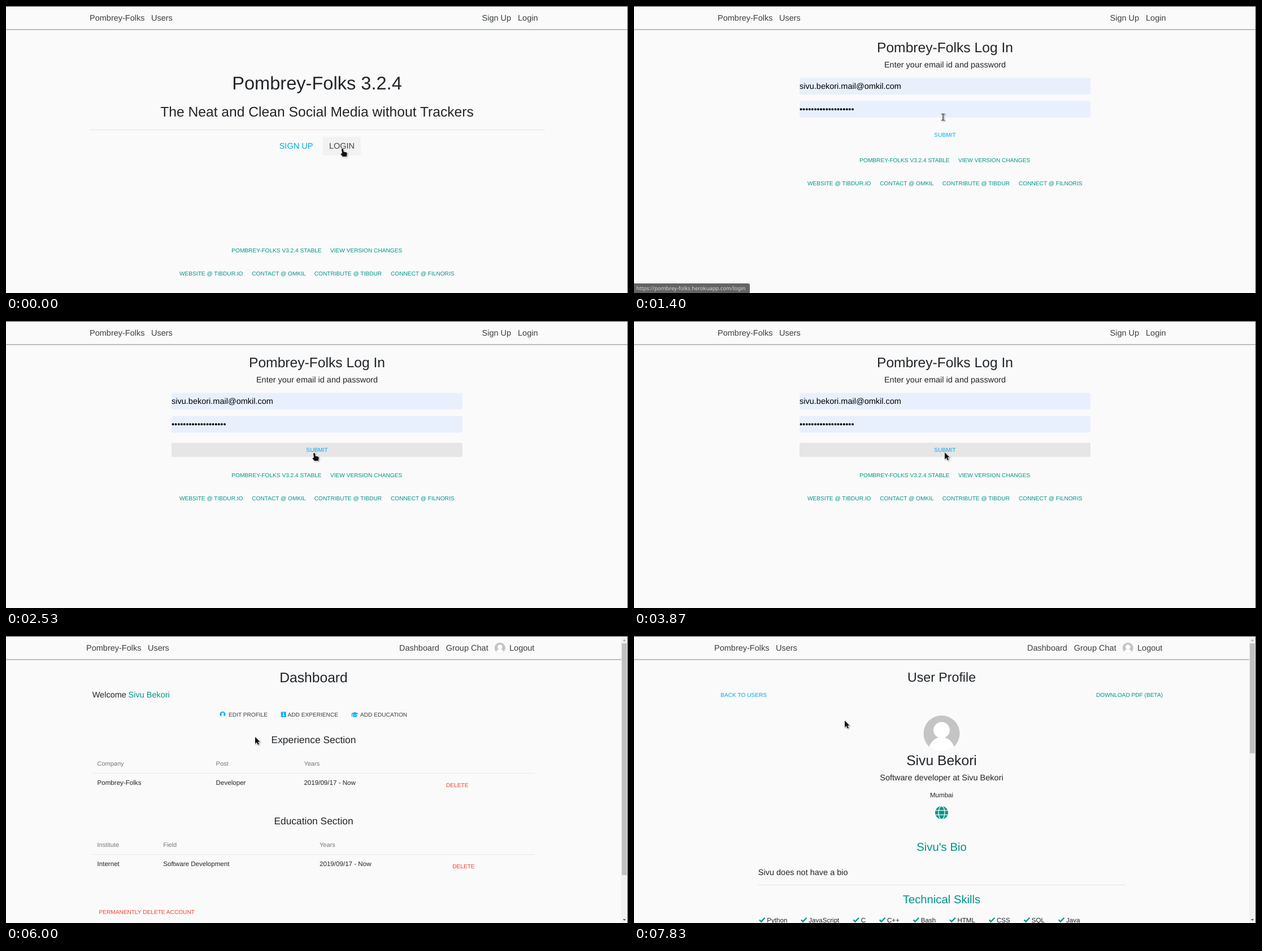
An HTML page with a canvas for the animation above (8000 ms loop, 1101 by 509 pixels).

```html
<!DOCTYPE html>
<html lang="en">
<head>
<meta charset="utf-8">
<title>Pombrey-Folks</title>
<style>
  html, body { margin: 0; width: 100%; height: 100%; overflow: hidden; background: #fafafa; }
  canvas { display: block; width: 1101px; height: 509px; }
</style>
</head>
<body>
<canvas id="stage" width="1101" height="509"></canvas>
<script>
const ctx = document.getElementById('stage').getContext('2d');
const LOOP = 8000, W = 1101, H = 509;
const BG = '#fafafa', INK = '#212529', NAV = '#3b3f42', BLUE = '#03a9f4',
      TEAL = '#009688', RED = '#f44336', GREY = '#777', RULE = '#e3e3e3';
const SANS = '"Liberation Sans", Arial, sans-serif';
const SMALL = 10.15, ROW = 11.6, BODY = 14.5, HEAD = 24.65;
const SITE = 'pombrey-folks.herokuapp.com';
const LOGIN_URL = `https://${SITE}/login`;
const USER_URL = `https://${SITE}/profile/sivubekori`;
const WAITING = `Waiting for ${SITE}...`;

// time, opacity, width, label
const BUBBLE = [
  [0, 0], [330, .3, 205, LOGIN_URL], [370, .65, 205, LOGIN_URL], [430, 1, 205, LOGIN_URL],
  [1400, .75, 205, LOGIN_URL], [1530, 0],
  [4070, 1, 205, WAITING], [4400, .5, 205, WAITING], [4530, 0],
  [6600, 1, 263, USER_URL], [6930, 1, 365, USER_URL],
  [7230, .7, 365, USER_URL], [7400, .3, 365, USER_URL], [7530, 0]
];
// time, shape, hotspot
const POINTER = [
  [0, 'hand', 600, 252], [870, 'beam', 547, 197], [1800, 'hand', 550, 226], [1930, 'hand', 550, 233],
  [3870, 'arrow', 550, 233], [6000, 'arrow', 441, 179], [6130, 'arrow', 310, 139],
  [6270, 'arrow', 277, 117], [6430, 'hand', 268, 113], [6930, 'arrow', 268, 113],
  [7730, 'arrow', 320, 131], [7830, 'arrow', 373, 150]
];
const SUBMIT_FILL = [[0, BG], [1800, '#f2f2f2'], [2400, '#ececec'], [2530, '#e6e6e6']];
const LOGIN_INK = [[0, '#434343'], [30, '#3f3f3f'], [170, '#343a40']];

const latest = (list, t) => list.filter(step => step[0] <= t).pop();

// Baselines sit on whole pixels, as in page text.
function text(str, x, y, size = BODY, color = INK, align = 'left', font = SANS, weight = 400) {
  ctx.font = `${weight} ${size}px ${font}`;
  ctx.textAlign = align;
  ctx.fillStyle = color;
  ctx.fillText(str, x, Math.round(y));
}

function box(x, y, w, h, color, r = 0) {
  ctx.fillStyle = color;
  ctx.beginPath();
  ctx.roundRect(x, y, w, h, r);
  ctx.fill();
}

function disc(x, y, r, color) {
  ctx.fillStyle = color;
  ctx.beginPath();
  ctx.arc(x, y, r, 0, 7);
  ctx.fill();
}

function shape(points, color) {
  ctx.fillStyle = color;
  ctx.beginPath();
  points.forEach(([x, y]) => ctx.lineTo(x, y));
  ctx.closePath();
  ctx.fill();
}

function avatar(x, y, r, color = '#c4c4c4', figure = '#fff') {
  ctx.save();
  disc(x, y, r, color);
  ctx.clip();
  disc(x, y - r * .19, r * .45, figure);
  ctx.beginPath();
  ctx.ellipse(x, y + r * .98, r * .72, r * .78, 0, 0, 7);
  ctx.fill();
  ctx.restore();
}

function nav(member, dx, right) {
  ['#a6a6a6', '#dcdcdc', '#f2f2f2'].forEach((c, i) => box(0, 41 + i, right, 1, c));
  text('Pombrey-Folks', 148 + dx, 26, BODY, NAV);
  text('Users', 257 + dx, 26, BODY, NAV);
  if (member) {
    text('Dashboard', 702 + dx, 26, BODY, NAV);
    text('Group Chat', 784.7 + dx, 26, BODY, NAV);
    avatar(880.3 + dx, 21.3, 9.5);
    text('Logout', 897 + dx, 26, BODY, NAV);
  } else {
    text('Sign Up', 842.5, 26, BODY, NAV);
    text('Login', 906, 26, BODY, NAV);
  }
}

function footer(y) {
  const link = (s, x, dy = 0) => text(s, x, y + dy, SMALL, TEAL);
  link('POMBREY-FOLKS V3.2.4 STABLE', 399.3);
  link('VIEW VERSION CHANGES', 574);
  link('WEBSITE @ TIBDUR.IO', 307, 41);
  link('CONTACT @ OMKIL', 435.2, 41);
  link('CONTRIBUTE @ TIBDUR', 545.8, 41);
  link('CONNECT @ FILNORIS', 681, 41);
}

function loader(t, y, start, steps) {
  const shown = steps.filter(s => s <= t).pop();
  ctx.globalAlpha = Math.min(1, .08 + (shown - start) / 880);
  text('Pombrey  Folks', 550.5, y, 20.8, '#117a64', 'center', 'Roboto, sans-serif', 500);
  ctx.globalAlpha = 1;
}

function scrollbar(end) {
  box(1089, 1, 11, H, '#f1f1f1');
  box(1090, 13, 9, end - 13, '#c1c1c1');
  shape([[1092, 9], [1094.5, 6], [1097, 9]], '#a3a3a3');
  shape([[1092, 502], [1094.5, 505], [1097, 502]], '#505050');
}

function landing(t) {
  nav(false, 0, W);
  text('Pombrey-Folks 3.2.4', 550.5, 148, 32.6, INK, 'center');
  text('The Neat and Clean Social Media without Trackers', 550.5, 196, HEAD, INK, 'center');
  box(148, 219, 806, 1, RULE);
  text('SIGN UP', 483.7, 253, BODY, BLUE);
  box(561, 232, 67, 33, '#f2f2f2', 2);
  text('LOGIN', 594.5, 253, BODY, latest(LOGIN_INK, t)[1], 'center');
  footer(437);
}

function login(t, hover) {
  nav(false, 0, W);
  text('Pombrey-Folks Log In', 550.5, 82, HEAD, INK, 'center');
  text('Enter your email id and password', 550.5, 109, BODY, INK, 'center');
  if (t >= 1400) {
    box(293, 127.5, 515, 29.5, '#e8f0fe', 3);
    box(293, 168.5, 515, 29.5, '#e8f0fe', 3);
    text('sivu.bekori.mail@omkil.com', 293, 147, BODY, '#000');
    text('•'.repeat(19), 293, 188, BODY, '#000');
  }
  box(293, 216, 515, 25, hover ? '#f2f2f2' : latest(SUBMIT_FILL, t)[1], 2);
  text('SUBMIT', 550.5, 232, SMALL, BLUE, 'center');
  footer(277);
}

function dashboardLoading(t) {
  nav(true, 0, W);
  text('Dashboard', 550.5, 82, HEAD, INK, 'center');
  loader(t, 113, 4070, [4070, 4230, 4400, 4530, 4900]);
  footer(141);
}

function table(y, title, heads, cells, xs, deleteX) {
  text(title, 544.5, y, 17.4, INK, 'center');
  xs.forEach((x, i) => {
    text(heads[i], x, y + 40, 11, GREY);
    text(cells[i], x, y + 74, ROW);
  });
  box(153, y + 53, 783, 1, '#e8e8e8');
  text('DELETE', deleteX, y + 78, SMALL, RED);
}

function actionIcons() {
  avatar(383.5, 139, 5, BLUE, BG);
  box(486.8, 134.5, 8.8, 9.4, BLUE, 1);
  shape([[489.8, 136], [492.6, 136], [491.8, 138], [493, 141.6], [491.2, 143], [489.4, 141.6], [490.6, 138]], BG);
  shape([[611, 137.5], [617.5, 135], [624, 137.5], [617.5, 140.3]], BLUE);
  shape([[613.8, 139.6], [617.5, 141.2], [621.3, 139.6], [621.6, 142.4], [617.5, 143.8], [613.5, 142.4]], BLUE);
  box(611.6, 138, 1, 5.4, BLUE);
}

function dashboard(t) {
  nav(true, -6, 1089);
  scrollbar(424);
  text('Dashboard', 544.5, 82, HEAD, INK, 'center');
  text('Welcome', 152.7, 109);
  text('Sivu Bekori', 216.5, 109, BODY, t >= 6430 ? '#00796b' : TEAL);
  actionIcons();
  text('EDIT PROFILE', 394, 143, SMALL, NAV);
  text('ADD EXPERIENCE', 498.5, 143, SMALL, NAV);
  text('ADD EDUCATION', 627, 143, SMALL, NAV);
  table(190, 'Experience Section', ['Company', 'Post', 'Years'],
    ['Pombrey-Folks', 'Developer', '2019/09/17 - Now'], [161.5, 371.6, 527.4], 779);
  table(334, 'Education Section', ['Institute', 'Field', 'Years'],
    ['Internet', 'Software Development', '2019/09/17 - Now'], [161.5, 278.2, 555], 790.2);
  text('PERMANENTLY DELETE ACCOUNT', 164.4, 493, SMALL, RED);
}

function profileHead(dx) {
  text('User Profile', 550.5 + dx, 81, 23.2, INK, 'center');
  text('BACK TO USERS', 159.3 + dx, 108, SMALL, BLUE);
  text('DOWNLOAD PDF (BETA)', 942 + dx, 108, SMALL, TEAL, 'right');
}

function profileLoading(t) {
  nav(true, 0, W);
  profileHead(0);
  loader(t, 149, 6930, [6930, 7100, 7230, 7400, 7530]);
  footer(176);
}

function globe(x, y, r) {
  disc(x, y, r, TEAL);
  ctx.strokeStyle = BG;
  ctx.lineWidth = 1.3;
  ctx.beginPath();
  for (const dy of [-r / 3, r / 3]) {
    ctx.moveTo(x - r, y + dy);
    ctx.lineTo(x + r, y + dy);
  }
  ctx.stroke();
  ctx.beginPath();
  ctx.ellipse(x, y, r * .48, r, 0, 0, 7);
  ctx.stroke();
}

function skill(name, x) {
  ctx.strokeStyle = TEAL;
  ctx.lineWidth = 2.3;
  ctx.beginPath();
  ctx.moveTo(x - 13.3, 503.4);
  ctx.lineTo(x - 10.2, 506.5);
  ctx.lineTo(x - 3.6, 499.8);
  ctx.stroke();
  text(name, x, 508, ROW);
}

function profile() {
  nav(true, -6, 1089);
  scrollbar(208);
  profileHead(-6);
  avatar(544.5, 173, 32);
  text('Sivu Bekori', 544.5, 229, HEAD, INK, 'center');
  text('Software developer at Sivu Bekori', 544.5, 256, BODY, INK, 'center');
  text('Mumbai', 544.5, 286, ROW, INK, 'center');
  globe(544.5, 313.3, 11.5);
  text("Sivu's Bio", 544.5, 381, 20.3, TEAL, 'center');
  text('Sivu does not have a bio', 219.8, 424);
  box(220, 441, 649, 1, RULE);
  text('Technical Skills', 544.5, 474, 20.3, TEAL, 'center');
  const xs = [235.3, 309.2, 401.7, 448, 507.8, 572.4, 642, 703.8, 765];
  ['Python', 'JavaScript', 'C', 'C++', 'Bash', 'HTML', 'CSS', 'SQL', 'Java'].forEach((s, i) => skill(s, xs[i]));
}

function bubble(t) {
  const [, alpha, width, label] = latest(BUBBLE, t);
  if (!alpha) return;
  ctx.globalAlpha = alpha;
  box(0, 492, width, 18, '#323232', [0, 3, 0, 0]);
  text(label, 4, 504, 9.4, '#fff', 'left', '"Noto Sans", "Open Sans", sans-serif');
  ctx.globalAlpha = 1;
}

const SHAPES = {
  arrow: new Path2D('M0 0V12.2L2.8 9.6L4.9 14L7 13L5 8.8H8.6Z'),
  hand: new Path2D('M-6 2Q-4.5 0 -3 2L-2.4 6.4L2.4 7.4Q4 8 3.8 10L3 15H-4L-7.4 11Q-8 9 -5 9.6Z'),
  beam: new Path2D('M-3 -6H-.7L0 -5.4L.7 -6H3V-5H.6V5H3V6H.7L0 5.4L-.7 6H-3V5H-.6V-5H-3Z')
};

function pointerAt(t) {
  if (t < 670 || t >= 870) return latest(POINTER, t).slice(1);
  const k = Math.floor((t - 670) / 33.4) / 6;
  const x = 600 - 53 * k, y = 252 - 55 * k;
  const kind = y < 198 ? 'beam' : y > 216 && y < 241 ? 'hand' : 'arrow';
  return [kind, x, y];
}

function pointer(kind, x, y) {
  ctx.save();
  ctx.translate(x, y);
  ctx.lineJoin = 'round';
  ctx.lineWidth = 1.3;
  ctx.strokeStyle = '#fff';
  ctx.shadowColor = 'rgba(0,0,0,.4)';
  ctx.shadowBlur = 2;
  ctx.shadowOffsetX = ctx.shadowOffsetY = 1;
  ctx.stroke(SHAPES[kind]);
  ctx.shadowColor = 'transparent';
  ctx.fillStyle = '#111';
  ctx.fill(SHAPES[kind]);
  ctx.restore();
}

function draw(t) {
  const [kind, x, y] = pointerAt(t);
  box(0, 0, W, H, BG);
  if (t < 670) landing(t);
  else if (t < 4070) login(t, t < 870 && kind === 'hand');
  else if (t < 5070) dashboardLoading(t);
  else if (t < 6930) dashboard(t);
  else if (t < 7730) profileLoading(t);
  else profile();
  bubble(t);
  box(0, 0, W, 1, '#3a3a3a');
  box(1100, 0, 1, H, '#3a3a3a');
  pointer(kind, x, y);
}

ctx.textRendering = 'geometricPrecision';
const start = performance.now();
function tick() {
  draw((performance.now() - start) % LOOP);
  requestAnimationFrame(tick);
}
tick();
</script>
</body>
</html>
```
